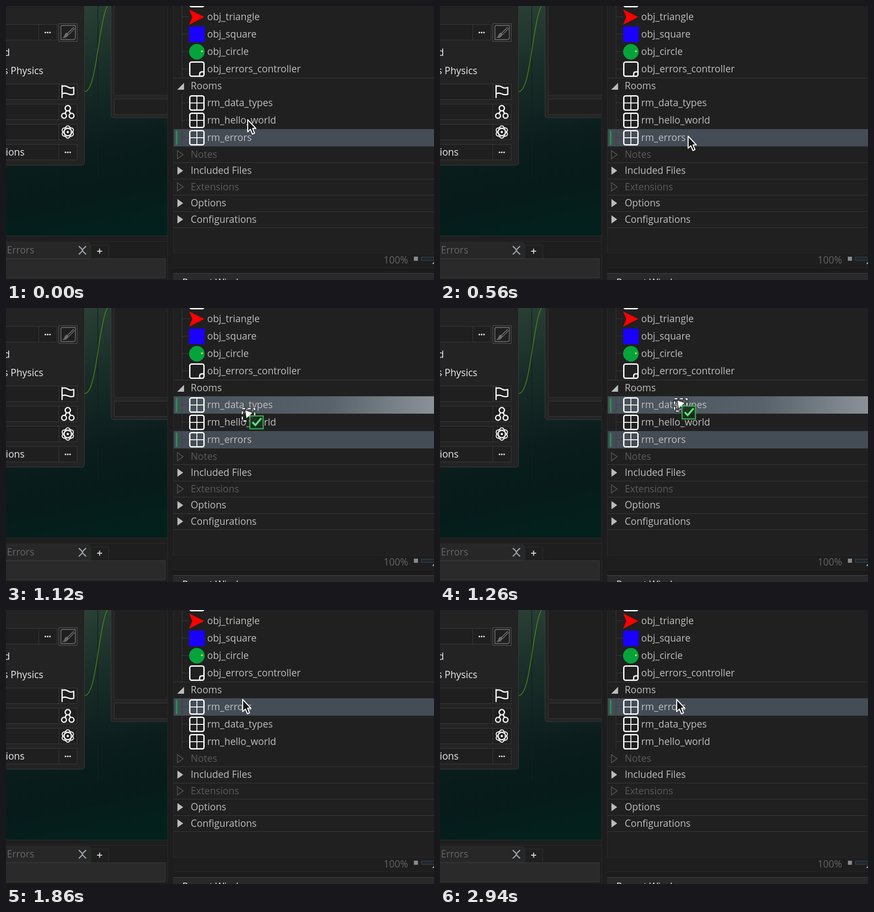
An HTML page that plays this animation: 935 px wide and 599 px high, repeating every 2960 ms.

```html
<!DOCTYPE html>
<html lang="en">
<head>
<meta charset="utf-8">
<title>Reordering rooms</title>
<style>
html, body { margin: 0; width: 100%; height: 100%; overflow: hidden; background: #202020; }
svg { display: block; width: 935px; height: 599px; }
text { font: 21px "Open Sans", "Noto Sans", sans-serif; fill: #bebebe; white-space: pre; }
.bright { fill: #ececec; text-anchor: end; }
.field { fill: #1f1f1f; stroke: #3b3b3b; }
.icon { fill: none; stroke: #f6f6f6; stroke-width: 2.8; stroke-linejoin: round; stroke-linecap: round; }
.frame { stroke-width: 3; }
.line { fill: none; stroke: #3a3a3a; }
</style>
</head>
<body>
<svg id="stage" viewBox="0 0 935 599">
  <defs>
    <linearGradient id="desk" x1="0.3" y1="0" x2="0.45" y2="1">
      <stop offset="0" stop-color="#2b4136"/>
      <stop offset="0.3" stop-color="#1a2e29"/>
      <stop offset="0.62" stop-color="#0b1d1d"/>
      <stop offset="0.82" stop-color="#071b1b"/>
      <stop offset="1" stop-color="#03201d"/>
    </linearGradient>
    <linearGradient id="onto">
      <stop offset="0" stop-color="#465059"/>
      <stop offset="0.6" stop-color="#59626a"/>
      <stop offset="1" stop-color="#8a9199"/>
    </linearGradient>
    <linearGradient id="above" x1="0" y1="0" x2="0" y2="1">
      <stop offset="0" stop-color="#8d959d"/>
      <stop offset="0.5" stop-color="#5b656d"/>
      <stop offset="1" stop-color="#566068"/>
    </linearGradient>
    <g id="room">
      <rect x="401.5" y="-15.5" width="31" height="31" rx="4" class="icon frame"/>
      <path d="M417 -15V15M402 0H432" class="icon" style="stroke-width:2"/>
    </g>
    <path id="arrow" d="M1 1.500V28L7 22.500L11.500 33L16 31L11.700 20.700H19Z"
      fill="#151515" stroke="#fff" stroke-width="2.200" stroke-linejoin="round"/>
  </defs>

  <!-- workspace -->
  <rect width="353" height="503" fill="url(#desk)"/>
  <path d="M200.500 0V376" stroke="#11211d" stroke-width="1.500"/>
  <path d="M172 187C202 187 202 -10 232 -10" fill="none" stroke="#4f8a16" stroke-width="1.500"/>
  <rect x="-10" y="-10" width="181.500" height="358" rx="5" fill="#232323" stroke="#3d3d3d"/>
  <rect x="229.500" y="-10" width="140" height="254" rx="5" fill="#242424" stroke="#3d3d3d"/>
  <rect x="236.500" y="-10" width="130" height="205.500" fill="#1f1f1f" stroke="#343434"/>
  <rect x="236.500" y="203.500" width="130" height="34" class="field"/>
  <g id="fields"></g>
  <rect x="115.500" y="38.500" width="40" height="39" class="field" style="stroke:#5c5c5c"/>
  <g fill="none" stroke="#6c6c6c" stroke-width="1.800">
    <path d="M120 46Q120 42.500 123.500 42.500H151.500V69Q151.500 73.500 147 73.500H120Z"/>
    <path d="M148 46.500L134 60M150 49L137 62.500"/>
    <path d="M134 59Q130 58 128 63Q127 68 122 69Q133 72 137 62Z" fill="#6c6c6c" stroke="none"/>
  </g>
  <path class="icon" d="M122.500 174V200M122.500 176Q129 173 135 177T148 178V193Q142 195 135 192T122.500 192"/>
  <g class="icon">
    <circle cx="135" cy="223.500" r="5.800"/><circle cx="126.800" cy="240" r="5.300"/><circle cx="143.200" cy="240" r="5.300"/>
    <path d="M132 229L129 235M138 229L141 235"/>
  </g>
  <g id="atom" class="icon" style="stroke-width:2"><circle cx="135" cy="275.500" r="1.500" fill="#f4f4f4"/></g>
  <text class="bright" x="8.500" y="108.500">d</text>
  <text class="bright" x="81.500" y="148.500">s Physics</text>
  <text class="bright" x="40.500" y="326.500">ions</text>

  <!-- output tabs -->
  <rect y="502" width="353" height="97" fill="#1e1e1e"/>
  <path d="M0 502.500H353M0 514.500H353" class="line" style="stroke:#2c2c2c"/>
  <path d="M-2 517.500H179Q183.500 517.500 183.500 522V551H-2Z" fill="#272727" stroke="#333"/>
  <path d="M185.500 551V522.500H224.500V551" fill="#1f1f1f" stroke="#303030"/>
  <text x="2" y="541" style="fill:#666">Errors</text>
  <path d="M159 525Q167 532 167 534T159 543M175 525Q167 532 167 534T175 543" fill="none" stroke="#9aa3a8" stroke-width="2.600"/>
  <path d="M199 536H210M204.500 530.500V541.500" stroke="#e0e0e0" stroke-width="2"/>
  <rect x="-2" y="552.500" width="350" height="42" fill="#2a2a2a" stroke="#3d3d3d"/>

  <!-- asset tree -->
  <rect x="353" width="582" height="599" fill="#202020"/>
  <rect x="353" width="12" height="599" fill="#1d1d1d"/>
  <path d="M353 0V599M365.500 0V572" stroke="#2c2c2c"/>
  <g id="rows"></g>
  <path id="tree" class="line"/>
  <g id="rooms"></g>
  <g id="assets">
    <rect x="401.500" y="-29.500" width="31" height="31" rx="4" class="icon frame"/>
    <path d="M400 7.500L433 24L400 41L407 24Z" fill="#f00"/>
    <rect x="400" y="45" width="34" height="34" fill="#1a00ff"/>
    <circle cx="417" cy="100" r="17" fill="#05a33c"/>
    <circle cx="428" cy="99" r="2" fill="#e5e544"/>
    <rect x="401.500" y="122.500" width="31" height="31" rx="4" class="icon frame"/>
    <path d="M423 153V149Q423 144 428 144H432" class="icon"/>
  </g>
  <g id="headers"></g>

  <!-- footer -->
  <rect x="365" y="540" width="570" height="33" fill="#1e1e1e"/>
  <path d="M365 540.500H935M365 572.500H935" class="line" style="stroke:#282828"/>
  <text x="825" y="562.500" style="fill:#646464">100%</text>
  <rect x="891" y="548" width="9" height="9" fill="#8a8a8a"/>
  <rect x="907.500" y="549" width="40" height="7" fill="#1c2730" stroke="#414d57"/>
  <path d="M931 564L935 559V564Z" fill="#aaa"/>
  <rect x="365" y="573" width="570" height="12" fill="#1b1b1b"/>
  <rect x="365" y="584" width="570" height="15" fill="#292929"/>
  <path d="M365 584.500H935" stroke="#454545"/>
  <text x="385" y="612" style="fill:#e8e8e8">Recent Windows</text>

  <use id="pointer" href="#arrow"/>
  <g id="drag">
    <g fill="none">
      <rect x="-5.500" y="-2.500" width="27" height="27" stroke="#1a1a1a" stroke-width="5" stroke-dasharray="8 4"/>
      <rect x="-5.500" y="-2.500" width="27" height="27" stroke="#f2f2f2" stroke-width="2.800" stroke-dasharray="6.500 5.500"/>
    </g>
    <path d="M0 0L3 20L8 15L15 22.500L19.500 18L12.500 11L18 6.500Z" fill="#fff" stroke="#222" stroke-width="1.500"/>
    <rect x="11" y="13.500" width="29" height="28" fill="#1d2a21" fill-opacity=".92" stroke="#32ad4b" stroke-width="2.600"/>
    <path d="M16.500 27L23 33.500L36 18.500" fill="none" stroke="#123c1c" stroke-width="7"/>
    <path d="M16.500 27L23 33.500L36 18.500" fill="none" stroke="#62e07c" stroke-width="4"/>
  </g>
</svg>
<script>
const LOOP = 2960, DRAG_START = 720, DROP = 1560, REORDER = 1680;
const $ = id => document.getElementById(id);
const add = (id, markup) => $(id).insertAdjacentHTML('beforeend', markup);

function dots(x, y) {
  return [-5, 0, 5].map(d => `<circle cx="${x + d}" cy="${y}" r="1.8" fill="#eee"/>`).join('');
}

function field(top, split, right) {
  add('fields', `<rect x="-2" y="${top}" width="${right + 2}" height="34" class="field"/>
    <path d="M${split} ${top}v34" class="line"/>`);
}

field(40.5, 71.5, 111.5);
[170.5, 214.5, 258.5, 302.5].forEach(y => field(y, 115.5, 155.5));
add('fields', dots(91, 58) + dots(135, 320));
[30, 90, 150].forEach(a =>
  add('atom', `<ellipse cx="135" cy="275.5" rx="13.5" ry="7.5" transform="rotate(${a} 135 275.5)"/>`));

['triangle', 'square', 'circle', 'errors_controller'].forEach((name, i) =>
  add('assets', `<text x="439.5" y="${31 + 38 * i}">obj_${name}</text>`));

[['Rooms', 175, 'open'], ['Notes', 325, 'empty'], ['Included Files', 360, ''], ['Extensions', 395.5, 'empty'],
 ['Options', 431, ''], ['Configurations', 466.5, '']].forEach(([name, y, state]) => {
  const empty = state === 'empty';
  const shape = state === 'open' ? `M389 ${y - 7}V${y + 8}H374Z` : `M374.5 ${y - 9}V${y + 9}L387 ${y}Z`;
  const paint = empty ? 'fill="none" stroke="#555" stroke-width="1.6"' : 'fill="#bcbcbc"';
  add('headers', `<path d="${shape}" ${paint}/>
    <text x="403.5" y="${y + 7}" ${empty ? 'style="fill:#5a5a5a"' : ''}>${name}</text>`);
});
add('headers', `<path class="line" d="${[157.5, 342.5, 378.5, 413.5, 449.5, 484.5].map(y => `M366 ${y}H935`).join('')}"/>`);

const rowCenters = [212, 250, 288];
$('tree').setAttribute('d', 'M384.5 0V157M384.5 193V307' +
  [24, 62, 100, 138, ...rowCenters].map(y => `M385 ${y - 0.5}H400`).join(''));
rowCenters.forEach(y => add('rooms', `<use href="#room" y="${y}"/><text x="439.5" y="${y + 7}"></text>`));
const labels = [...$('rooms').querySelectorAll('text')];

add('rows', `<rect id="target" x="366.5" y="193" width="569" height="38"/>
  <rect id="selected" x="366.5" width="569" height="38" fill="#444c56"/>
  <path id="mark" fill="#23964a"/><path id="bar" d="M371 3.5h3.5v31h-3.5z" fill="#23964a"/>`);

const ease = p => p * p * (3 - 2 * p);
const mix = (a, b, p) => a + (b - a) * p;
const path = [[660, 541, 283], [1040, 524, 235], [1260, 518, 201], [1440, 516, 194]];

function pointerAt(t) {
  if (t < path[0][0]) {
    const p = ease(Math.min(1, Math.max(0, (t - 40) / 440))), q = 1 - p;
    return [q * q * 527 + 2 * p * q * 556 + p * p * 541, q * q * 247 + 2 * p * q * 267 + p * p * 283];
  }
  for (let i = 1; i < path.length; i++) {
    const [t0, x0, y0] = path[i - 1], [t1, x1, y1] = path[i];
    if (t < t1) {
      let p = (t - t0) / (t1 - t0);
      if (i === 1) p = p * (0.6 + 0.4 * p);
      if (i === path.length - 1) p = p * (2 - p);
      return [mix(x0, x1, p), mix(y0, y1, p)];
    }
  }
  return path[path.length - 1].slice(1);
}

function show(id, on) { $(id).setAttribute('visibility', on ? 'visible' : 'hidden'); }

function draw(t) {
  const [x, y] = pointerAt(t);
  const dragging = t >= DRAG_START && t < DROP, moved = t >= REORDER;
  const place = `translate(${x} ${y})`;
  $('pointer').setAttribute('transform', place);
  $('drag').setAttribute('transform', place);
  show('pointer', !dragging);
  show('drag', dragging);

  const names = moved ? ['errors', 'data_types', 'hello_world'] : ['data_types', 'hello_world', 'errors'];
  names.forEach((name, i) => { labels[i].textContent = 'rm_' + name; });
  const top = moved ? 193 : 269;
  $('selected').setAttribute('y', top);
  $('bar').setAttribute('transform', `translate(0 ${top})`);

  const over = t >= DRAG_START && !moved && y < 231, insert = y < 199;
  show('target', over);
  show('mark', over);
  $('target').setAttribute('fill', insert ? 'url(#above)' : 'url(#onto)');
  $('mark').setAttribute('d', insert ? 'M373 195L378 206H375V228H371V206H368Z' : 'M371 196.5h3.5v31h-3.5z');
}

const start = performance.now();
function tick() {
  draw((performance.now() - start) % LOOP);
  requestAnimationFrame(tick);
}
tick();
</script>
</body>
</html>
```
